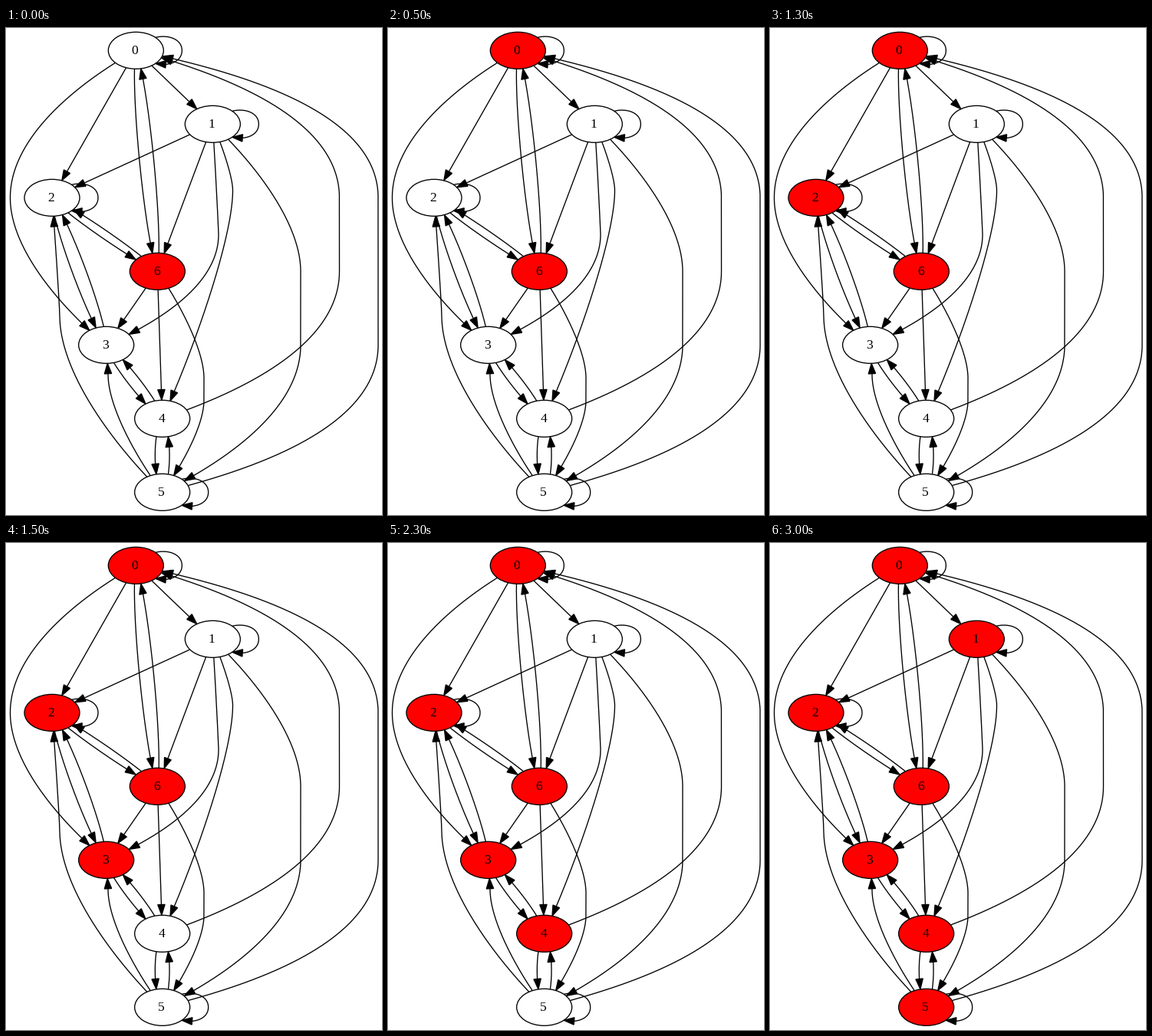
A matplotlib script for the animation above (3.5 s loop, 490 by 635 pixels).

```python
import numpy as np
import matplotlib.pyplot as plt
from matplotlib.animation import FuncAnimation
from matplotlib.patches import Ellipse, Polygon

W, H, DPI = 490, 635, 100
PX = 72 / DPI              # points per pixel
LINE = 4 / 3 * PX
RX, RY = 36, 24
HEAD, HALF = 13.33, 4.67   # arrowhead length and half width
SHIFT = 12.5               # sideways bend of two-way edges
VISITS = [6, 0, 2, 3, 4, 5, 1]


def row(rank):
    return 29.33 + 96 * rank


# Top to bottom: one node per rank.
NODES = {n: np.array([x, row(rank)]) for rank, (n, x) in enumerate([
    (0, 169.33), (1, 269.33), (2, 60), (6, 197.33), (3, 130.67), (4, 203.67), (5, 203.67)])}

fig = plt.figure(figsize=(W / DPI, H / DPI), dpi=DPI, facecolor="white")
ax = fig.add_axes([0, 0, 1, 1])
ax.set_xlim(0, W)
ax.set_ylim(H, 0)
ax.axis("off")


def bezier(p0, p1, p2, p3):
    t = np.linspace(0, 1, 500)[:, None]
    s = 1 - t
    return s**3 * p0 + 3 * s**2 * t * p1 + 3 * s * t**2 * p2 + t**3 * p3


def outside(points, n):
    d = (points - NODES[n]) / (RX, RY)
    return np.hypot(d[:, 0], d[:, 1]) > 1


def draw_edge(a, b, *parts):
    """Clip the curve to both ovals and end it in an arrowhead."""
    pts = np.concatenate(parts)
    pts = pts[outside(pts, a) & outside(pts, b)]
    tip = pts[-1]
    line = pts[np.hypot(*(pts - tip).T) >= HEAD]
    base = line[-1]
    along = (tip - base) / np.hypot(*(tip - base))
    side = HALF * np.array([-along[1], along[0]])
    ax.plot(*line.T, color="black", lw=LINE, solid_capstyle="butt", snap=False, zorder=3)
    ax.add_patch(Polygon([base + side, tip, base - side], fc="black", ec="black",
                         lw=LINE, joinstyle="miter", snap=False, zorder=3))


def direct(a, b, shift=0):
    """Centre to centre, bent sideways by the shift."""
    p, q = NODES[a], NODES[b]
    lead, bend = 0.15 * (q - p), np.array([shift, 0])
    draw_edge(a, b, bezier(p, p + lead + bend, q - lead + bend, q))


def both_ways(a, b):
    direct(a, b, -SHIFT)
    direct(b, a, SHIFT)


def sweep(n, rail):
    """Arc from a node's centre that becomes vertical at the rail point."""
    p = NODES[n]
    dx, dy = rail - p
    lean = abs(dx) / (abs(dx) + 1.1 * abs(dy))
    rise = (1 - lean) * dy
    return bezier(p, p + (0.4 * dx, 0.34 * rise), p + (dx, rise), rail)


def detour(a, b, x, first, last=None):
    """Swing out to a vertical rail at x between two ranks, then back in."""
    last = first if last is None else last
    enter, leave = np.array([x, row(first)]), np.array([x, row(last)])
    draw_edge(a, b, sweep(a, enter), sweep(b, leave)[::-1])


def loop(n):
    p, flip = NODES[n], np.array([1, -1])
    half = np.array([(0.71 * RX, -0.71 * RY), (42, -21), (60, -15), (60, 0)])
    top = bezier(*half)
    draw_edge(n, n, p + top, p + top[::-1] * flip)


ovals = {}
for n, (x, y) in NODES.items():
    ovals[n] = ax.add_patch(Ellipse((x, y), 2 * RX, 2 * RY, fc="white", ec="black",
                                    lw=LINE, zorder=2))
    ax.text(x - 1.1, y + 5, str(n), family="Liberation Serif", size=17.5 * PX,
            ha="center", va="baseline", zorder=4)

for n in (0, 1, 2, 5):
    loop(n)
for a, b in [(0, 1), (0, 2), (1, 2), (1, 6), (6, 3), (6, 4)]:
    direct(a, b)
for a, b in [(0, 6), (2, 6), (2, 3), (3, 4), (4, 5)]:
    both_ways(a, b)

detour(0, 3, 5.5, 2)
detour(1, 3, 277, 2.5)
detour(1, 4, 295.5, 1.9)
detour(1, 5, 384, 3, 4)
detour(6, 5, 258, 4.45, 4.75)
detour(4, 0, 434.5, 3, 2)
detour(5, 0, 485, 4, 2)
detour(5, 2, 70, 3.6)
detour(5, 3, 133, 4.4)


def update(i):
    reached = VISITS[:i + 1]
    for n, oval in ovals.items():
        oval.set_facecolor("#ff0000" if n in reached else "white")
    return list(ovals.values())


anim = FuncAnimation(fig, update, frames=len(VISITS), interval=500,
                     repeat=True, repeat_delay=0, blit=False)
plt.show()
```
